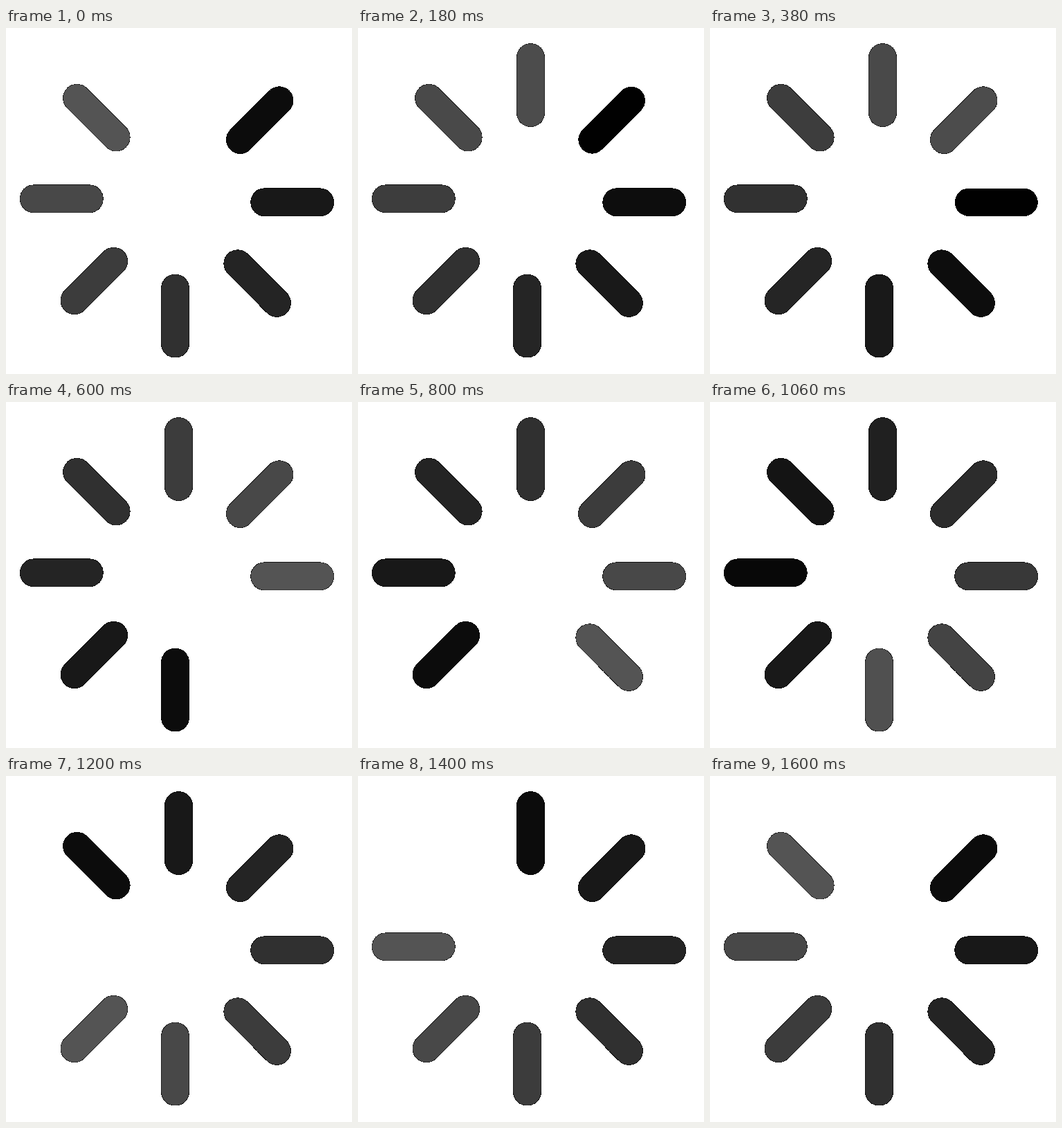
An HTML page with a canvas that plays this animation: 500 px wide and 500 px high, repeating every 1.62 s.

```html
<!DOCTYPE html>
<html lang="en">
<head>
<meta charset="utf-8">
<title>Spinner</title>
<style>
  html, body { margin: 0; width: 100%; height: 100%; overflow: hidden; background: #fff; }
  canvas { display: block; width: 500px; height: 500px; }
</style>
</head>
<body>
<canvas id="stage" width="500" height="500"></canvas>
<script>
const SIZE = 500, BARS = 8;
const TICK = 20, LOOP = 1620, TURN = 1600, STEP = TURN / BARS;
const PEAK = 84;
const CENTER = { x: 247, y: 249.3 };
const BAR = { x: 2.5, y: -166.75, length: 120, width: 40 };

const ctx = document.getElementById('stage').getContext('2d', { willReadFrequently: true });

// Antialiased coverage of one bar: the touched pixels and their alpha.
function barMask(index) {
  ctx.clearRect(0, 0, SIZE, SIZE);
  ctx.save();
  ctx.translate(CENTER.x, CENTER.y);
  ctx.rotate(index * 2 * Math.PI / BARS);
  ctx.lineCap = 'round';
  ctx.lineWidth = BAR.width;
  const reach = (BAR.length - BAR.width) / 2;
  ctx.beginPath();
  ctx.moveTo(BAR.x, BAR.y - reach);
  ctx.lineTo(BAR.x, BAR.y + reach);
  ctx.stroke();
  ctx.restore();

  const { data } = ctx.getImageData(0, 0, SIZE, SIZE);
  const mask = [];
  for (let i = 0; i < data.length; i += 4) {
    if (data[i + 3]) mask.push({ i, alpha: data[i + 3] / 255 });
  }
  return mask;
}

const masks = Array.from({ length: BARS }, (_, index) => barMask(index));
const image = ctx.createImageData(SIZE, SIZE);

// Quick rise to the peak grey, then a slow fall back to zero.
function greyAt(phase) {
  return phase < STEP
    ? PEAK * phase / STEP
    : PEAK * (TURN - phase) / (TURN - STEP);
}

function draw(time) {
  image.data.fill(255);
  masks.forEach((mask, index) => {
    const grey = greyAt((time - index * STEP + TURN) % TURN);
    for (const { i, alpha } of mask) {
      // Pure black is see-through, so edges darken and a zero bar vanishes.
      const value = Math.round(grey * alpha);
      if (value) image.data.fill(value, i, i + 3);
    }
  });
  ctx.putImageData(image, 0, 0);
}

let shown = -1;
function frame() {
  const time = Math.floor(performance.now() % LOOP / TICK) * TICK;
  if (time !== shown) draw(shown = time);
  requestAnimationFrame(frame);
}
frame();
</script>
</body>
</html>
```
